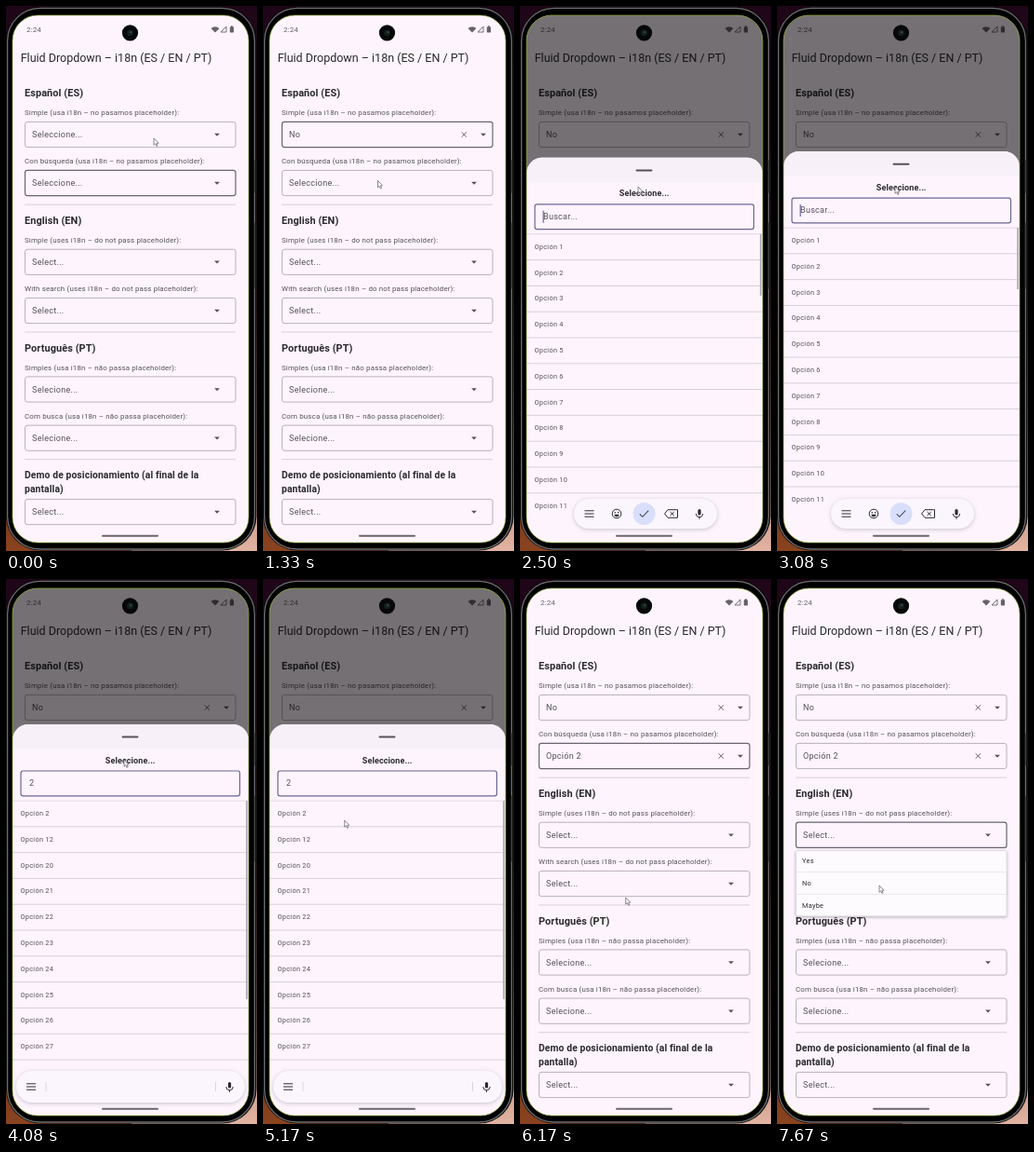
An HTML page with a canvas for the animation above (8 s loop, 270 by 585 pixels).

```html
<!DOCTYPE html>
<html lang="es">
<head>
<meta charset="utf-8">
<title>Fluid Dropdown</title>
<style>
  html, body { margin: 0; width: 100%; height: 100%; overflow: hidden; background: #000; }
  canvas { display: block; width: 270px; height: 585px; }
</style>
</head>
<body>
<canvas id="stage"></canvas>
<script>
const W = 270, H = 585, LOOP = 8000, FPS = 12;
const INK = '#2b292e', SOFT = '#565159', LINE = '#cdc7d1', SURFACE = '#fdf4fe';
const canvas = document.getElementById('stage');
const ctx = canvas.getContext('2d');
const ratio = window.devicePixelRatio || 1;
canvas.width = W * ratio;
canvas.height = H * ratio;

// Linear interpolation over [time, value...] keys.
function track(t, keys) {
  if (t <= keys[0][0]) return keys[0].slice(1);
  for (let i = 1; i < keys.length; i++) {
    const a = keys[i - 1], b = keys[i];
    if (t < b[0]) {
      const k = (t - a[0]) / (b[0] - a[0]);
      return a.slice(1).map((v, j) => v + (b[j + 1] - v) * k);
    }
  }
  return keys[keys.length - 1].slice(1);
}

function text(str, x, middle, size, { color = SOFT, weight = 400, spacing = 0.28, align = 'left' } = {}) {
  ctx.font = `${weight} ${size}px Roboto, sans-serif`;
  ctx.letterSpacing = spacing + 'px';
  ctx.textAlign = align;
  ctx.fillStyle = color;
  ctx.fillText(str, x, middle + size * 0.355);
}

function box(x, y, w, h, r, fill, stroke, width = 1) {
  ctx.beginPath();
  ctx.roundRect(x, y, w, h, r);
  if (fill) { ctx.fillStyle = fill; ctx.fill(); }
  if (stroke) { ctx.strokeStyle = stroke; ctx.lineWidth = width; ctx.stroke(); }
}

function lines(color, width, ...paths) {
  ctx.strokeStyle = color;
  ctx.lineWidth = width;
  ctx.beginPath();
  for (const [x, y, ...rest] of paths) {
    ctx.moveTo(x, y);
    for (let i = 0; i < rest.length; i += 2) ctx.lineTo(rest[i], rest[i + 1]);
  }
  ctx.stroke();
}

function shape(color, ...points) {
  ctx.fillStyle = color;
  ctx.beginPath();
  points.forEach(([x, y]) => ctx.lineTo(x, y));
  ctx.closePath();
  ctx.fill();
}

function circle(x, y, r, fill, stroke, width) {
  box(x - r, y - r, 2 * r, 2 * r, r, fill, stroke, width);
}

function gradient(x0, y0, x1, y1, stops) {
  const fill = ctx.createLinearGradient(x0, y0, x1, y1);
  stops.forEach(([at, color]) => fill.addColorStop(at, color));
  return fill;
}

function withShadow(blur, alpha, draw) {
  ctx.save();
  ctx.shadowColor = `rgba(0,0,0,${alpha})`;
  ctx.shadowBlur = blur * ratio;
  ctx.shadowOffsetY = ratio;
  draw();
  ctx.restore();
}

function faded(alpha, draw) {
  if (alpha <= 0) return;
  ctx.save();
  ctx.globalAlpha = alpha;
  draw();
  ctx.restore();
}

function drawStatusBar() {
  const gray = '#66626a';
  text('2:24', 22, 25, 8, { color: gray, spacing: 0.1 });
  ctx.fillStyle = gray;
  ctx.beginPath();
  ctx.moveTo(225, 28.5);
  ctx.arc(225, 28.5, 6.3, -Math.PI * 0.75, -Math.PI * 0.25);
  ctx.fill();
  lines(gray, 0.9, [231, 28, 237, 28, 237, 22, 231, 28]);
  box(240.8, 22.2, 4.2, 6.3, 0.8, gray);
  box(242, 21.2, 1.8, 1.5, 0.3, gray);
}

function drawField(middle, placeholder, value, focused) {
  box(20.5, middle - 13.6, 226.5, 27.2, 2.5, null, focused ? '#69646f' : '#a6a0aa', focused ? 1.2 : 0.8);
  text(value || placeholder, 28, middle, 9.04);
  const x = value ? 237 : 227;
  shape(SOFT, [x - 2.9, middle - 1.3], [x + 2.9, middle - 1.3], [x, middle + 1.7]);
  if (value) {
    const a = middle - 2.7, b = middle + 2.7;
    lines(SOFT, 0.9, [213.6, a, 219, b], [219, a, 213.6, b]);
  }
}

function drawHeading(str, y, size) {
  text(str, 20, y, size, { color: INK, weight: 600, spacing: 0.1 });
}

function drawSection(y, heading, labels) {
  drawHeading(heading, y, 10.9);
  labels.forEach((label, i) => text(label, 20, y + 21 + i * 52.3, 7.91, { spacing: 0.17 }));
  lines(LINE, 0.8, [20, y + 120, 247, y + 120]);
}

function drawPage(t) {
  ctx.fillStyle = SURFACE;
  ctx.fillRect(0, 0, W, H);
  drawStatusBar();
  text('Fluid Dropdown – i18n (ES / EN / PT)', 15.7, 55.5, 12.5, { color: INK, spacing: 0 });
  drawSection(93.2, 'Español (ES)', ['Simple (usa i18n – no pasamos placeholder):', 'Con búsqueda (usa i18n – no pasamos placeholder):']);
  drawSection(230, 'English (EN)', ['Simple (uses i18n – do not pass placeholder):', 'With search (uses i18n – do not pass placeholder):']);
  drawSection(366.7, 'Português (PT)', ['Simples (usa i18n – não passa placeholder):', 'Com busca (usa i18n – não passa placeholder):']);
  drawHeading('Demo de posicionamiento (al final de la', 503, 10.35);
  drawHeading('pantalla)', 518.3, 10.35);

  const focus = t < 250 ? 1 : t < 2170 ? 0 : t < 7000 ? 1 : 2;
  const values = [t >= 1250 && 'No', t >= 5420 && 'Opción 2'];
  const prompts = ['Seleccione...', 'Select...', 'Selecione...'];
  [138, 190, 274.8, 327, 411.5, 463.7, 543].forEach((middle, i) =>
    drawField(middle, i === 6 ? 'Select...' : prompts[i >> 1], values[i], focus === i));

  faded(track(t, [[249, 0], [250, 0.5], [330, 1], [1240, 1], [1330, 0]])[0],
    () => drawMenu(154.2, ['Sí', 'No', 'Tal vez']));
  faded(track(t, [[6999, 0], [7000, 0.4], [7160, 1]])[0],
    () => drawMenu(291, ['Yes', 'No', 'Maybe']));
}

function drawMenu(y, items) {
  withShadow(3, 0.3, () => box(20, y, 227.5, 71.3, 2.5, '#fefbff'));
  box(20.4, y + 0.4, 226.7, 70.5, 2.5, null, '#d3ced6', 0.8);
  items.forEach((item, i) => {
    const middle = y + 11.5 + i * 24;
    text(item, 27, middle, 7.35, { color: INK });
    if (i) lines('#e4dfe7', 0.7, [21, middle - 12, 247, middle - 12]);
  });
}

function sheetTop(t) {
  if (t < 5420) return 156 + 140 * Math.exp(-(t - 2171) / 110);
  return track(t, [[5420, 160], [5504, 232.5], [5587, 375], [5670, 505], [5754, 590]])[0];
}

function caretVisible(t) {
  return t < 2670 || (t >= 3080 && t < 4080) || (t >= 4580 && t < 5170);
}

function drawSheet(t) {
  const top = sheetTop(t), typed = t >= 3580, closing = t >= 5420;
  const listTop = top + 82, rowHeight = 27.8;
  const viewHeight = closing ? 296 : track(t, [[3580, 303], [3900, 288]])[0];

  box(7, top, 254, H, [17, 17, 0, 0], SURFACE);
  box(7, top, 254, 26, [17, 17, 0, 0], '#f7f0f9');
  box(124.5, top + 12.6, 18, 2, 1, SOFT);
  text('Seleccione...', 133.7, top + 38.4, 9.04, { color: INK, weight: 600, spacing: 0.1, align: 'center' });

  const focused = t >= 2250 && !closing;
  box(16, top + 50, 235.5, 26.8, 2.3, null, focused ? '#6b6693' : '#8b8592', focused ? 1.2 : 0.8);
  text(typed ? '2' : 'Buscar...', 25, top + 63, 9.04);
  if (caretVisible(t)) box(typed ? 30.4 : 24.6, top + 57, 1.1, 13, 0, '#5d5889');

  let options = Array.from({ length: 50 }, (_, i) => String(i + 1));
  if (typed) options = options.filter(n => n.includes('2'));
  ctx.save();
  ctx.beginPath();
  ctx.rect(7, listTop - 0.5, 254, viewHeight);
  ctx.clip();
  if (closing) {
    ctx.fillStyle = gradient(7, 0, 261, 0,
      [[0, '#e9e2ea'], [0.35, '#d7d2d8'], [0.5, '#dcd7de'], [0.75, '#f1eaf2'], [1, '#f6eff8']]);
    ctx.fillRect(7, listTop, 254, rowHeight);
  }
  for (let i = 0; i < Math.min(options.length, 13); i++) {
    const y = listTop + i * rowHeight;
    lines(LINE, 0.8, [7, y, 261, y]);
    text('Opción ' + options[i], 15.5, y + 13.4, 7.35);
  }
  if (closing) lines(SOFT, 0.9, [238.8, listTop + 13.4, 241, listTop + 15.8, 245.6, listTop + 10.8]);
  if (t >= 2420) {
    const thumb = viewHeight ** 2 / (options.length * rowHeight);
    box(258, listTop, 2, thumb, 0, '#bab5bd');
  }
  ctx.restore();
}

function drawMenuIcon(x, y) {
  lines(INK, 1, ...[-3.2, 0, 3.2].map(d => [x - 5, y + d, x + 5, y + d]));
}

function drawMic(x, y) {
  box(x - 1.6, y - 5, 3.2, 6.6, 1.6, INK);
  ctx.strokeStyle = INK;
  ctx.lineWidth = 1;
  ctx.beginPath();
  ctx.arc(x, y, 3.7, 0, Math.PI);
  ctx.moveTo(x, y + 3.7);
  ctx.lineTo(x, y + 5.8);
  ctx.stroke();
}

function drawToolIcons(y) {
  circle(104, y, 4.8, null, INK, 1);
  circle(102.3, y - 1.3, 0.8, INK);
  circle(105.7, y - 1.3, 0.8, INK);
  ctx.beginPath();
  ctx.arc(104, y + 0.7, 2.5, 0, Math.PI);
  ctx.fillStyle = INK;
  ctx.fill();
  circle(133.5, y, 12, '#d9dffb');
  lines('#424659', 1.1, [128.8, y + 0.3, 131.8, y + 3.3, 138.2, y - 3.3]);
  lines(INK, 1, [155.6, y, 159, y - 4.3, 169.5, y - 4.3, 169.5, y + 4.3, 159, y + 4.3, 155.6, y],
    [161.5, y - 2, 165.8, y + 2], [165.8, y - 2, 161.5, y + 2]);
}

function drawKeyboardBar(t) {
  const wide = track(t, [[3580, 0], [3900, 1]])[0];
  const shown = track(t, [[2330, 0], [2500, 1], [5400, 1], [5420, 0]])[0];
  const mix = (a, b) => a + (b - a) * wide;
  const y = 545 + (1 - shown) * 14;
  faded(shown, () => {
    const left = mix(58, 11), half = mix(16, 17);
    withShadow(4, 0.2, () => box(left, y - half, mix(154, 246), 2 * half, half, '#fbf6fe'));
    drawMenuIcon(mix(74.5, 27), y);
    drawMic(mix(193, 240.5), y);
    faded(1 - wide, () => drawToolIcons(y));
    faded(wide, () => lines('#d2ccd6', 0.8, [43, y - 5, 43, y + 5], [225.5, y - 5, 225.5, y + 5]));
  });
}

function drawPhoneBody() {
  ctx.fillStyle = gradient(0, 0, 0, H, [[0, '#1e0618'], [0.5, '#2a0b14'], [1, '#8a431f']]);
  ctx.fillRect(0, 0, W / 2, H);
  ctx.fillStyle = gradient(0, 0, 0, H, [[0, '#1e0618'], [0.5, '#3a141a'], [1, '#e2b3a0']]);
  ctx.fillRect(W / 2, 0, W / 2, H);
  box(0, 1, 269.5, 583.5, 37, '#0a0a0a');
  box(1.6, 2.4, 265.8, 580.6, 35, '#000', '#6c6d6f', 1.3);
  box(267.5, 165, 2.5, 36, 1, '#161616');
  box(267.5, 232, 2.5, 72, 1, '#161616');
}

function drawCamera() {
  circle(133.5, 28.8, 8.6, '#060808');
  circle(133.5, 28.8, 3.4, '#141f20');
  circle(134.3, 28.2, 1.1, '#2f5243');
}

function drawPointer(t) {
  const [x, y] = track(t, [
    [500, 159, 142], [830, 146, 162], [1170, 124, 187], [1337, 123.5, 187.5],
    [1587, 124.5, 194], [1837, 125.5, 191.5], [2170, 125.5, 191.5], [2504, 127, 194],
    [4670, 127, 194], [4920, 87.7, 259], [5920, 87.7, 259], [6170, 113.7, 342],
    [6254, 113, 334], [6337, 113, 334], [6837, 106, 276], [7250, 106, 276], [7670, 110, 329]
  ]);
  ctx.save();
  ctx.translate(x, y);
  ctx.beginPath();
  [[0, 0], [0, 7.3], [1.7, 5.8], [2.9, 8.4], [4.1, 7.9], [3, 5.4], [5.1, 5.2]]
    .forEach(p => ctx.lineTo(...p));
  ctx.closePath();
  ctx.fillStyle = '#f8f4f9';
  ctx.fill();
  ctx.strokeStyle = '#625e65';
  ctx.lineWidth = 0.7;
  ctx.stroke();
  ctx.restore();
}

function render(t) {
  ctx.setTransform(ratio, 0, 0, ratio, 0, 0);
  drawPhoneBody();
  ctx.save();
  ctx.beginPath();
  ctx.roundRect(7, 10, 254, 566, 27);
  ctx.clip();
  drawPage(t);
  if (t >= 2170 && t < 5837) {
    const [scrim] = track(t, [[2170, 0.33], [2340, 0.54], [5420, 0.54], [5504, 0.455], [5754, 0.06], [5837, 0]]);
    ctx.fillStyle = `rgba(0,0,0,${scrim})`;
    ctx.fillRect(0, 0, W, H);
    drawSheet(t);
    drawKeyboardBar(t);
  }
  box(103, 567.7, 61, 2.1, 1, '#69656c');
  ctx.restore();
  box(7, 10, 254, 566, 27, null, 'rgba(150,178,50,0.75)', 0.9);
  drawCamera();
  drawPointer(t);
}

function tick() {
  const t = performance.now() % LOOP;
  render(Math.floor((t + 5) * FPS / 1000) * 1000 / FPS + 4);
  requestAnimationFrame(tick);
}
tick();
</script>
</body>
</html>
```
